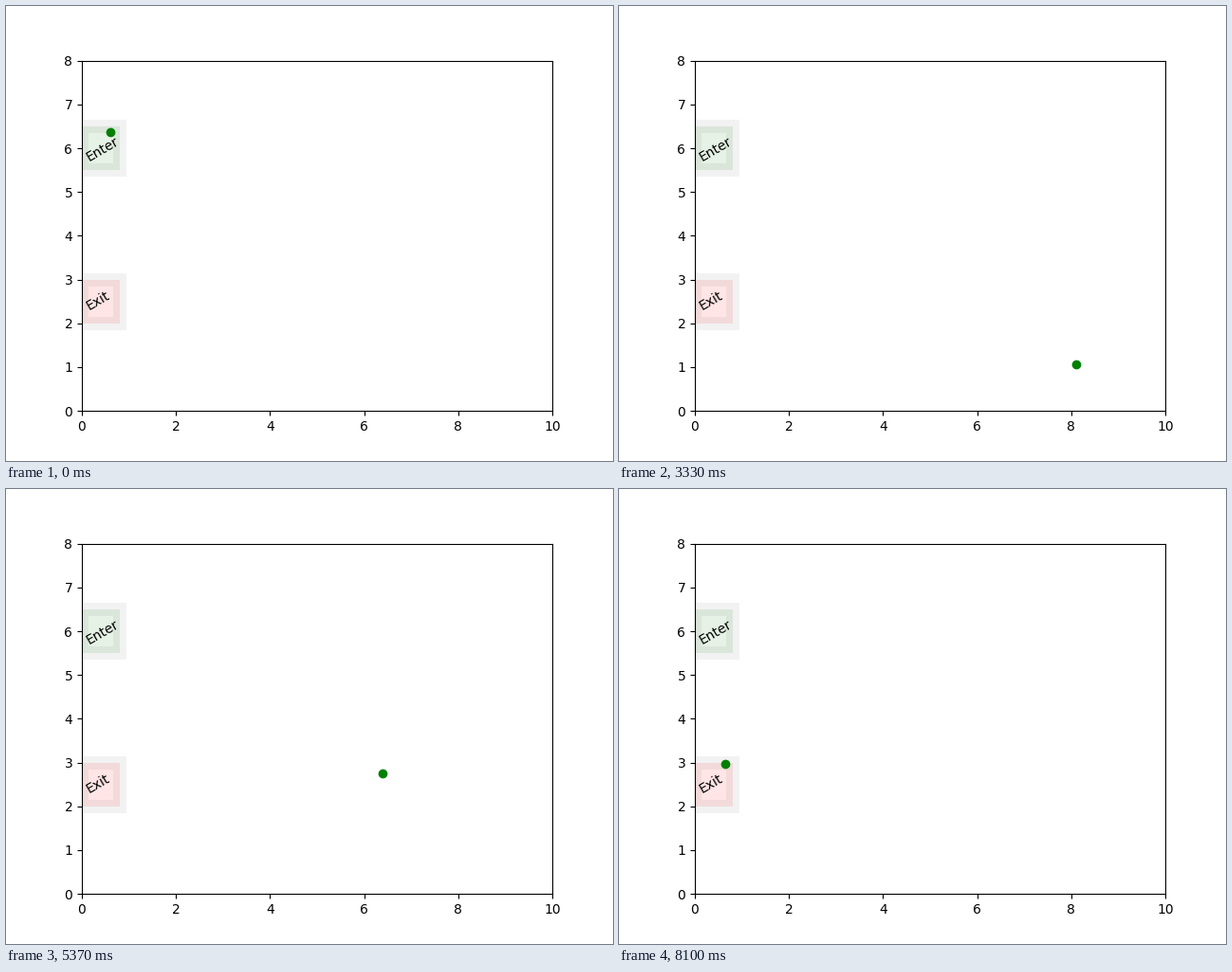
Write a matplotlib script that moves like this. It is 640 by 480 pixels and loops after 8.13 s.

```python
import numpy as np
import matplotlib.pyplot as plt
from matplotlib.animation import FuncAnimation
from matplotlib.colors import to_rgba
from matplotlib.patches import Rectangle

INTERVAL = 30
FRAMES = 271
STEPS = 244          # moves of the walker in one loop
SPEED = 0.075        # sideways travel per step
WALLS = 0.445, 9.53

# The walker's turns: step and height
TURNS = [0, 18, 68, 108, 120, 211, 243]
HEIGHTS = [6.37, 7.6, 3.36, 0.5, 0.33, 5.69, 2.96]

fig, ax = plt.subplots(figsize=(6.4, 4.8), dpi=100)
ax.set_xlim(0, 10)
ax.set_ylim(0, 8)


def door(label, y, label_y, color):
    """Translucent doorway on the left wall with a tilted label."""
    ax.add_patch(Rectangle((0, y), 0.8, 1, linewidth=10,
                           facecolor=to_rgba(color, 0.1),
                           edgecolor=to_rgba("gray", 0.1)))
    ax.text(0.05, label_y, label, rotation=30)


def bounce(x, low, high):
    """Fold a straight run back and forth between two walls."""
    span = high - low
    return high - abs(span - (x - low) % (2 * span))


door("Enter", 5.5, 5.7, "green")
door("Exit", 2.0, 2.3, "red")

dot, = ax.plot([], [], "o", color="green", markersize=6, zorder=5)


def update(i):
    step = round(i * STEPS / FRAMES)
    x = bounce(0.6 + SPEED * step, *WALLS)
    y = np.interp(step, TURNS, HEIGHTS)
    dot.set_data([x], [y])
    return dot,


anim = FuncAnimation(fig, update, frames=FRAMES, interval=INTERVAL,
                     repeat=True, repeat_delay=0, blit=False)
plt.show()
```
